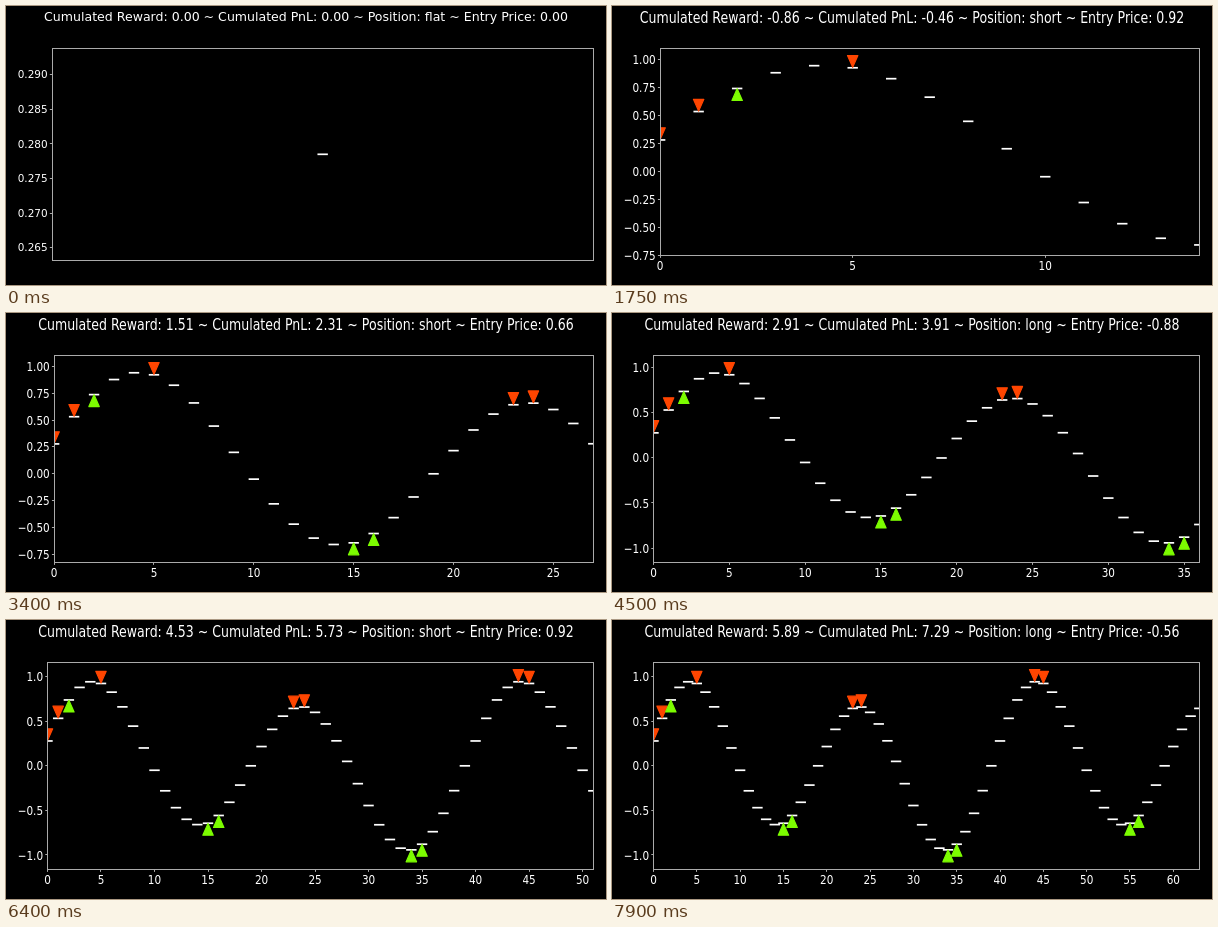
Animation, 600 px wide and 279 px high, one loop 8 s. Source, as an HTML page with a canvas:

```html
<!DOCTYPE html>
<html lang="en">
<head>
<meta charset="utf-8">
<title>Trading chart</title>
<style>
  html, body { margin: 0; width: 100%; height: 100%; overflow: hidden; background: #000; }
  canvas { display: block; width: 100%; height: 100%; }
</style>
</head>
<body>
<canvas id="stage" width="600" height="279"></canvas>
<script>
const ctx = document.getElementById('stage').getContext('2d');
const W = 600, H = 279, LOOP = 8000;
const TOP = 42.2, RIGHT = 587.3;
const TITLE_SIZE = 12.56, TICK_SIZE = 10.46;
const FEE = 0.1;
const SELLS = [0, 1, 5, 23, 24, 44, 45];
const BUYS = [2, 15, 16, 34, 35, 55, 56];

const price = i => 0.8 * Math.sin((i + 1) * Math.PI / 10) + 0.2 * Math.sin((i + 1) * Math.PI / 20);
const side = i => SELLS.includes(i) ? 1 : BUYS.includes(i) ? -1 : 0;
const snap = v => Math.floor(v) + 0.5;

// Account state after all trades made before the given step.
function ledger(step) {
  let reward = 0, pnl = 0, pos = 0, entry = 0;
  for (let i = 0; i < step; i++) {
    const trade = -side(i);
    if (!trade) continue;
    reward -= FEE;
    if (pos === 0) {
      pos = trade;
      entry = price(i);
    } else if (pos !== trade) {
      const gain = pos * (price(i) - entry);
      pnl += gain;
      reward += gain;
      pos = entry = 0;
    }
  }
  return { reward, pnl, entry, position: ['short', 'flat', 'long'][pos + 1] };
}

// Round tick spacing giving at most nine intervals.
function tickStep(span) {
  const raw = span / 9;
  const mag = 10 ** Math.floor(Math.log10(raw));
  return mag * [1, 2, 2.5, 5, 10].find(m => m * mag >= raw - 1e-9);
}

function decimals(step) {
  let d = 0;
  while (Math.abs(step * 10 ** d - Math.round(step * 10 ** d)) > 1e-6) d++;
  return d;
}

function setFont(size) {
  ctx.font = size + 'px "DejaVu Sans", sans-serif';
}

function label(str, x, y, size, align, stretch) {
  ctx.save();
  ctx.translate(x, y);
  ctx.scale(1, stretch);
  setFont(size);
  ctx.textAlign = align;
  ctx.fillText(str, 0, 0);
  ctx.restore();
}

// Vertical limits: room for the markers plus a five percent margin.
function yLimits(step, height, stretch) {
  if (step === 0) return [price(0) * 0.945, price(0) * 1.055];
  const pad = 8.4 * stretch;
  let scale = height, lo, hi;
  for (let n = 0; n < 30; n++) {
    lo = Infinity;
    hi = -Infinity;
    for (let i = 0; i <= step; i++) {
      const p = price(i), s = i < step ? side(i) : 0;
      hi = Math.max(hi, p + (s > 0 ? pad : 1) / scale);
      lo = Math.min(lo, p - (s < 0 ? pad : 1) / scale);
    }
    scale = height / 1.1 / (hi - lo);
  }
  const margin = (hi - lo) * 0.05;
  return [lo - margin, hi + margin];
}

// The plot shrinks when a tick label near its right edge would stick out.
function overhang(step, width) {
  if (step === 0) return 0;
  const unit = (width / 1.1 - 10) / step;
  const edge = 5 + width * 0.05 / 1.1;
  const gap = tickStep(width / unit);
  const last = Math.floor((step + edge / unit) / gap + 1e-9) * gap;
  setFont(TICK_SIZE);
  const half = ctx.measureText(last.toFixed(decimals(gap))).width / 2;
  return Math.max(0, half - edge + (last - step) * unit);
}

function triangle(x, y, dir, stretch) {
  const h = 4.9 * stretch * dir;
  ctx.fillStyle = ctx.strokeStyle = dir > 0 ? '#ff4500' : '#7cfc00';
  ctx.lineWidth = 1.2;
  ctx.lineJoin = 'round';
  ctx.beginPath();
  ctx.moveTo(x - 5.2, y - h);
  ctx.lineTo(x + 5.2, y - h);
  ctx.lineTo(x, y + h);
  ctx.closePath();
  ctx.fill();
  ctx.stroke();
}

function draw(step) {
  const stretch = step < 2 ? 1 : 1.2;
  const bottom = H - 24.8 * stretch;
  const height = bottom - TOP;
  const [lo, hi] = yLimits(step, height, stretch);
  const gap = tickStep(hi - lo), digits = decimals(gap);
  const ticks = [];
  for (let n = Math.ceil(lo / gap); n * gap <= hi; n++) {
    ticks.push({ v: n * gap, str: (n * gap).toFixed(digits).replace('-', '\u2212') });
  }
  setFont(TICK_SIZE);
  const left = 16.1 + Math.max(...ticks.map(t => ctx.measureText(t.str).width));
  const right = RIGHT - overhang(step, RIGHT - left);
  const toX = i => step ? left + (right - left) * i / step : (left + right) / 2;
  const toY = v => TOP + (hi - v) / (hi - lo) * height;

  ctx.fillStyle = '#000';
  ctx.fillRect(0, 0, W, H);

  ctx.save();
  ctx.beginPath();
  ctx.rect(left, TOP, right - left, height);
  ctx.clip();
  ctx.fillStyle = '#fff';
  for (let i = 0; i <= step; i++) {
    ctx.fillRect(toX(i) - 5.2, toY(price(i)) - 0.75, 10.4, 1.7);
  }
  for (let i = 0; i < step; i++) {
    const s = side(i);
    if (s) triangle(toX(i), toY(price(i)) - s * 0.03 * height, s, stretch);
  }
  ctx.restore();

  ctx.strokeStyle = '#aaa';
  ctx.lineWidth = 1;
  ctx.lineJoin = 'miter';
  const x0 = snap(left), y0 = snap(TOP), x1 = snap(right), y1 = snap(bottom);
  ctx.strokeRect(x0, y0, x1 - x0, y1 - y0);

  ctx.fillStyle = '#fff';
  ctx.beginPath();
  for (const t of ticks) {
    const y = toY(t.v);
    ctx.moveTo(left - 2.2, snap(y));
    ctx.lineTo(left, snap(y));
    label(t.str, left - 4.4, y + 3.8 * stretch, TICK_SIZE, 'right', stretch);
  }
  for (let i = 0; i < step; i += 5) {
    const x = snap(toX(i));
    ctx.moveTo(x, bottom);
    ctx.lineTo(x, bottom + 2.2 * stretch);
    label(String(i), toX(i), bottom + 12.3 * stretch, TICK_SIZE, 'center', stretch);
  }
  ctx.stroke();

  const acc = ledger(step);
  const title = [
    'Cumulated Reward: ' + acc.reward.toFixed(2),
    'Cumulated PnL: ' + acc.pnl.toFixed(2),
    'Position: ' + acc.position,
    'Entry Price: ' + acc.entry.toFixed(2)
  ].join(' ~ ');
  label(title, W / 2, 5.6 + 9.6 * stretch, TITLE_SIZE, 'center', stretch);
}

// One step every 125 ms, held to a 50 ms grid.
function tick() {
  const t = performance.now() % LOOP;
  draw(Math.floor(Math.floor(t / 50) / 2.5));
  requestAnimationFrame(tick);
}
tick();
</script>
</body>
</html>
```
